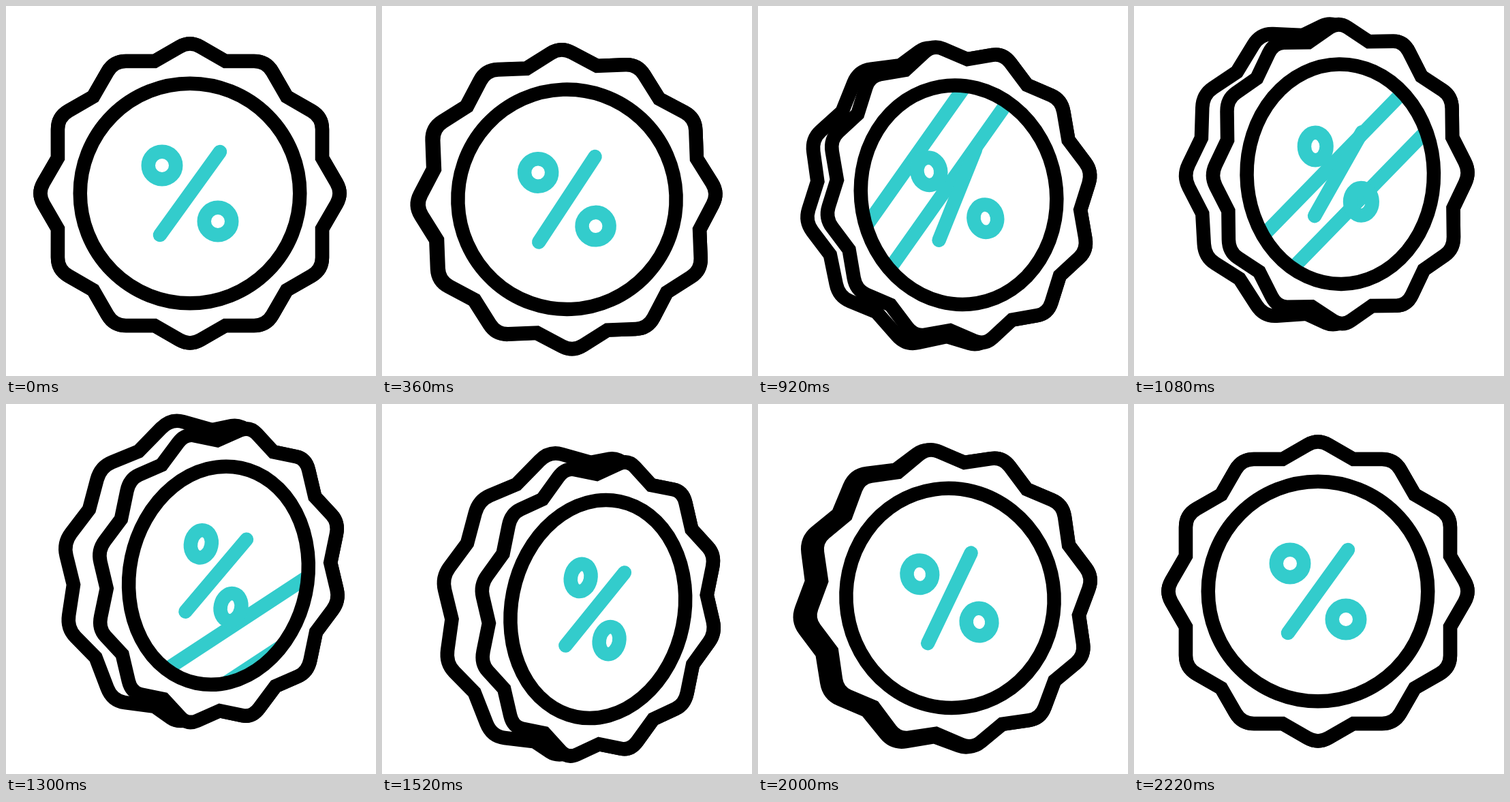
Recreate the animation shown at these times as an HTML page with a canvas. Size 543 by 543 pixels, loop 2400 ms.

```html
<!DOCTYPE html>
<html lang="en">
<head>
<meta charset="utf-8">
<title>Discount badge</title>
<style>
html, body { margin: 0; height: 100%; overflow: hidden; background: #fff; }
canvas { display: block; width: 100vmin; height: 100vmin; }
</style>
</head>
<body>
<canvas id="stage" width="543" height="543"></canvas>
<script>
const ctx = document.getElementById('stage').getContext('2d');
const LOOP = 2400, TEAL = '#33cccc', RING = 161.25;

// [time, value] keys joined by sine easing
const HEIGHT = [[200, 275], [680, 310], [1180, 240], [1630, 311], [2200, 275]];
const TILT = [[200, 0], [780, -12.8], [1420, 14], [1900, -11], [2200, 0]];
const TURN = [[200, 0], [1605, 0.215], [2200, 0]];

// How far the rear rim stands out, every 15 degrees from the left edge to the top
const RIM_X = [58, 55, 51, 42, 28, 12, 16];
const RIM_Y = [0, 5, 10, 14, 20, 15, 0];

function valueAt(keys, t) {
  if (t <= keys[0][0]) return keys[0][1];
  for (let i = 1; i < keys.length; i++) {
    const [t0, a] = keys[i - 1], [t1, b] = keys[i];
    if (t < t1) return a + (b - a) * (1 - Math.cos(Math.PI * (t - t0) / (t1 - t0))) / 2;
  }
  return keys[keys.length - 1][1];
}

const mix = (p, q, f) => [p[0] + (q[0] - p[0]) * f, p[1] + (q[1] - p[1]) * f];

// Paths are built in the turned plane but stroked with an even line width
function plane(x, y, angle, scale, build) {
  ctx.save();
  ctx.translate(x, y);
  ctx.rotate(angle);
  ctx.scale(scale, 1);
  ctx.beginPath();
  build();
  ctx.restore();
}

function scallops(scale, rim) {
  const points = Array.from({ length: 24 }, (_, k) => {
    const a = k * Math.PI / 12, m = Math.min(k, 24 - k);
    const r = k % 2 ? 200.8 : 224;
    const dx = (RIM_X[m] || 0) * rim / scale;
    const dy = (RIM_Y[m] || 0) * rim * Math.sign(Math.sin(a));
    return [-r * Math.cos(a) - dx, -r * Math.sin(a) - dy];
  });
  for (let k = 0; k < 24; k += 2) {
    const tip = points[k], before = points[(k + 23) % 24], after = points[k + 1];
    ctx.lineTo(...mix(tip, before, 0.3));
    ctx.quadraticCurveTo(...tip, ...mix(tip, after, 0.3));
    ctx.lineTo(...after);
  }
  ctx.closePath();
}

function percent() {
  for (const d of [-41, 41]) {
    ctx.moveTo(d + 20.25, d);
    ctx.arc(d, d, 20.25, 0, 2 * Math.PI);
  }
  ctx.moveTo(44, -61);
  ctx.lineTo(-44, 61);
}

function shine(lead) {
  for (const offset of [lead, lead - 64.5]) {
    const c = offset * Math.SQRT1_2;
    ctx.moveTo(c - 200, c + 200);
    ctx.lineTo(c + 200, c - 200);
  }
}

function draw(t) {
  const y = valueAt(HEIGHT, t), turn = valueAt(TURN, t);
  const angle = valueAt(TILT, t) * Math.PI / 180;
  const x = 270 + 219.75 * turn, scale = 1 - turn;
  const ring = () => ctx.arc(0, 0, RING, 0, 2 * Math.PI);

  ctx.fillStyle = '#fff';
  ctx.fillRect(0, 0, 543, 543);
  ctx.lineWidth = 20.5;
  ctx.lineCap = 'round';

  ctx.strokeStyle = '#000';
  for (const rim of [turn / 0.215, 0]) {
    plane(x, y, angle, scale, () => scallops(scale, rim));
    ctx.fill();
    ctx.stroke();
  }

  ctx.save();
  plane(x, y, angle, scale, ring);
  ctx.clip();
  ctx.strokeStyle = TEAL;
  plane(x, y, angle, 1, () => shine(0.415 * (t - 920) - 20));
  ctx.stroke();
  ctx.restore();

  ctx.strokeStyle = '#000';
  plane(x, y, angle, scale, ring);
  ctx.stroke();

  ctx.strokeStyle = TEAL;
  plane(270 + 200 * turn, y, angle, 1 - 1.3 * turn, percent);
  ctx.stroke();
}

function frame() {
  draw(Math.floor(performance.now() % LOOP / 20) * 20);
  requestAnimationFrame(frame);
}
frame();
</script>
</body>
</html>
```
